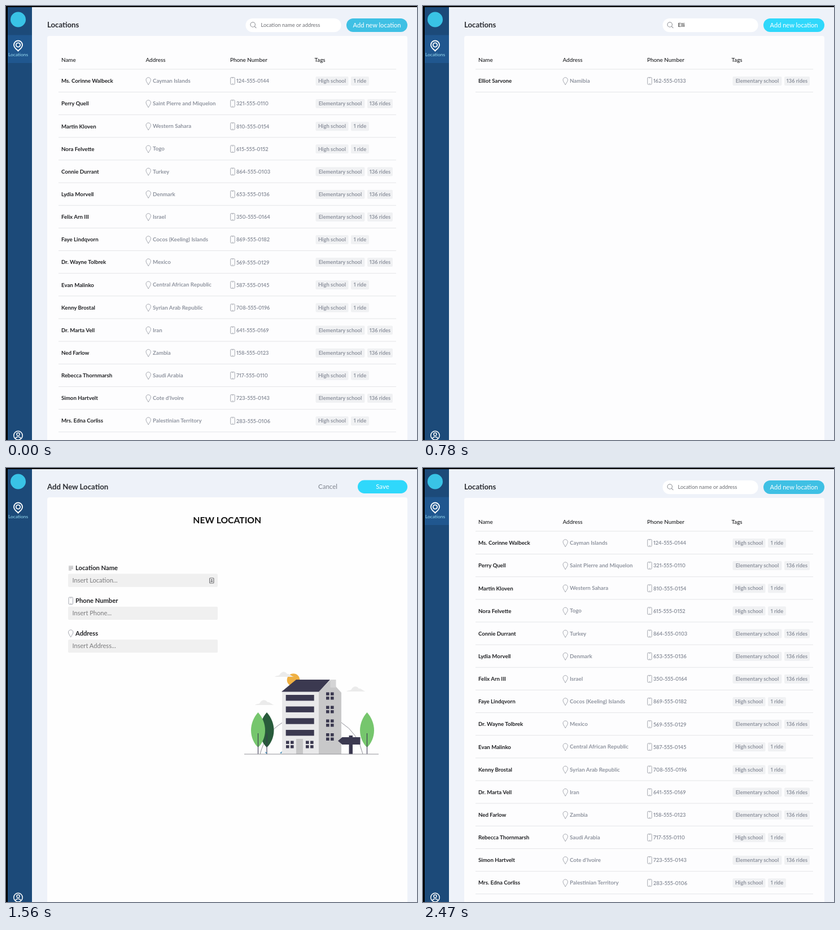
Write an HTML page that moves like this. It is 728 px wide and 769 px high and loops after 2600 ms.

```html
<!DOCTYPE html>
<html lang="en">
<head>
<meta charset="utf-8">
<title>Locations</title>
<style>
  html, body { margin: 0; width: 100%; height: 100%; overflow: hidden; background: #eef2f9; }
  svg { display: block; width: 728px; height: 769px; font-family: Lato, "Open Sans", sans-serif;
    font-variant-numeric: proportional-nums; }
  .bold { font-weight: 700; }
  .mid { font-weight: 500; }
</style>
</head>
<body>
<svg id="stage" viewBox="0 0 728 769"></svg>
<script>
const ROWS = [
  ["Ms. Corinne Walbeck", "Cayman Islands", "124-555-0144", 0],
  ["Perry Quell", "Saint Pierre and Miquelon", "321-555-0110", 1],
  ["Martin Kloven", "Western Sahara", "810-555-0154", 0],
  ["Nora Felvette", "Togo", "615-555-0152", 0],
  ["Connie Durrant", "Turkey", "864-555-0103", 1],
  ["Lydia Morvell", "Denmark", "653-555-0136", 1],
  ["Felix Arn III", "Israel", "350-555-0164", 1],
  ["Faye Lindqvorn", "Cocos (Keeling) Islands", "869-555-0182", 0],
  ["Dr. Wayne Tolbrek", "Mexico", "569-555-0129", 1],
  ["Evan Malinko", "Central African Republic", "587-555-0145", 0],
  ["Kenny Brostal", "Syrian Arab Republic", "708-555-0196", 0],
  ["Dr. Marta Vell", "Iran", "641-555-0169", 1],
  ["Ned Farlow", "Zambia", "158-555-0123", 1],
  ["Rebecca Thornmarsh", "Saudi Arabia", "717-555-0110", 0],
  ["Simon Hartvelt", "Cote d'Ivoire", "723-555-0143", 1],
  ["Mrs. Edna Corliss", "Palestinian Territory", "283-555-0106", 0]
];
const MATCH = ["Elliot Sarvone", "Namibia", "162-555-0133", 1];
const GREY = "#8f949f", NAVY = "#3b3950", CYAN = "#3fc0e4", BRIGHT = "#2fd8fb";

const text = (x, y, size, fill, str, cls = "", anchor = "start") =>
  `<text x="${x}" y="${y}" font-size="${size}" fill="${fill}" class="${cls}" text-anchor="${anchor}">${str}</text>`;
const rect = (x, y, w, h, fill, r = 0, extra = "") =>
  `<rect x="${x}" y="${y}" width="${w}" height="${h}" rx="${r}" fill="${fill}" ${extra}/>`;
const path = (d, fill, stroke = "none", width = 1) =>
  `<path d="${d}" fill="${fill}" stroke="${stroke}" stroke-width="${width}"/>`;
const circle = (x, y, r, fill, stroke = "none", width = 1) =>
  `<circle cx="${x}" cy="${y}" r="${r}" fill="${fill}" stroke="${stroke}" stroke-width="${width}"/>`;
const group = (id, body) => `<g id="${id}">${body}</g>`;

const pin = (x, y) => path(`M${x} ${y + 13}C${x - 2} ${y + 9} ${x - 4.2} ${y + 7} ${x - 4.2} ${y + 4.2}
  a4.2 4.2 0 0 1 8.4 0C${x + 4.2} ${y + 7} ${x + 2} ${y + 9} ${x} ${y + 13}Z`, "none", "#a5a8b0");
const phone = (x, y) => rect(x, y, 7.5, 12.5, "none", 1.5, 'stroke="#a5a8b0"') +
  path(`M${x + 2.2} ${y + 1.3}h3M${x + 2.5} ${y + 11}h2.5`, "none", "#b9bbc1", .8);
const tag = (x, y, w, str) => rect(x, y - 7.8, w, 16, "#f0f1f3", 2) +
  text(x + w / 2, y + 3.4, 9.4, GREY, str, "bold", "middle");

function row([name, place, number, elementary], i) {
  const y = 132.7 + i * 40.15;
  const tags = elementary
    ? tag(548.5, y, 87, "Elementary school") + tag(640, y, 45, "136 rides")
    : tag(548.5, y, 58, "High school") + tag(611, y, 32, "1 ride");
  return text(98, y + 3.5, 9.7, "#202124", name, "bold") +
    pin(252.2, y - 6) + text(260, y + 3.3, 9.7, GREY, place, "bold") +
    phone(397.7, y - 6.2) + text(408, y + 3.6, 9.3, GREY, number, "bold") +
    tags + rect(93, y + 19.3, 598, 1, "#e4e5e8");
}

function sidebar() {
  return rect(3, 2, 43, 767, "#1c4a79") +
    rect(3, 51.5, 43, 49.5, "#20578f", 0, 'id="active"') +
    circle(21.5, 24, 13.5, "#39c3e6") +
    path("M21.5 79.6C19.8 76.8 14 75 14 69a7.5 7.5 0 0 1 15 0C29 75 23.2 76.8 21.5 79.6Z", "none", "#fff", 1.8) +
    circle(21.5, 69, 3.7, "none", "#fff", 1.8) +
    text(21.5, 88.6, 8.4, "#9be0f5", "Locations", "", "middle") +
    circle(21.5, 761, 7.7, "none", "#fff", 1.5) +
    circle(21.5, 758.8, 2.6, "none", "#fff", 1.4) +
    path("M16.6 766.4c1.5-4 8.3-4 9.8 0", "none", "#fff", 1.4);
}

function listPage() {
  const heads = [[98, "Name"], [247.5, "Address"], [397, "Phone Number"], [546.5, "Tags"]];
  return rect(73, 53, 638, 730, "#fdfdfe", 4) +
    text(73, 38.4, 13.2, "#2a2c31", "Locations", "bold") +
    rect(424.5, 22, 169, 24.3, "#fff", 12) +
    circle(437.2, 33, 4.2, "none", "#8e9096", 1.1) + path("M440.3 36.2l3 3", "none", "#8e9096", 1.1) +
    group("hint", text(451.5, 37.2, 9.4, "#6c6e73", "Location name or address")) +
    group("query", text(451.5, 37.2, 9.7, "#222", "Elli")) +
    rect(451.3, 28, 1, 11.5, "#222", 0, 'id="caret"') +
    rect(603, 22, 108, 24, CYAN, 12, 'id="add"') +
    text(657, 37.8, 11.1, "#fff", "Add new location", "", "middle") +
    heads.map(([x, s]) => text(x, 99.3, 9.9, "#1f2023", s, "mid")).join("") +
    rect(93, 111.5, 598, 1, "#e4e5e8") +
    group("all", ROWS.map(row).join("")) + group("found", row(MATCH, 0));
}

function building() {
  const leaf = (x, fill) => path(`M${x} 433C${x + 8} 442 ${x + 12.5} 453 ${x + 12.5} 465S${x + 7} 489 ${x} 495
    C${x - 7} 489 ${x - 12.5} 477 ${x - 12.5} 465S${x - 8} 442 ${x} 433Z`, fill) +
    path(`M${x} 470V507`, "none", NAVY, 1.1);
  const cloud = (x, y) => path(`M${x} ${y}c4-3 7-1 9-4 3-6 10-6 13-1 4-1 7 4 12 5z`, "#ebebeb");
  const panes = (x, y) => [0, 8].map(dx => [0, 7.6].map(dy => rect(x + dx, y + dy, 5.6, 5.4, NAVY)).join("")).join("");
  return path("M450 507Q460 469 489 451.5M594 451Q624 470 632 507", "none", "#8f8f98") +
    circle(509, 375.5, 11.3, "#efb043") +
    cloud(476, 370) + cloud(441, 420) + cloud(603, 396) +
    path("M489 395H554V507H489Z", "#e9e9ea") +
    path("M554 396L574 376 594 398V507H554Z", "#c8c8c9") +
    rect(574.5, 375, 10, 14, "#d4d4d5") +
    path("M488 396.5L514 375H574L554 396.5Z", NAVY) +
    [402, 422.5, 443.3, 464].map(y => rect(495.7, y, 50, 10.4, NAVY)).join("") +
    [397.5, 421.5, 445.5, 470].map(y => panes(567, y)).join("") +
    panes(496, 483.5) + panes(531, 483.5) + rect(514, 480, 12, 27, "#c6c6c7") +
    leaf(462, "#285b3b") + leaf(446.5, "#76c66d") + leaf(639.5, "#76c66d") +
    rect(607.5, 474, 6.5, 33, NAVY) + path("M588 483.5L595.5 477H627.5V490H595.5Z", NAVY) +
    path("M458.5 503l4 1-1 3zM485 505l4-3-1 4z", "#4a8db5") +
    rect(422, 506.5, 238, 1, "#94949a");
}

function formPage() {
  const field = (y, label, hint) => text(123, y, 11.2, "#202124", label, "bold") +
    rect(110, y + 6.5, 265, 23.3, "#f0f0f0", 2) + text(117.5, y + 22, 11.1, "#7b7b7d", hint);
  return rect(73, 52, 638, 730, "#fefefe", 4) +
    text(73, 38, 13.2, "#2a2c31", "Add New Location", "bold") +
    text(570, 37.4, 11.5, "#7d828c", "Cancel", "", "middle") +
    rect(623, 21.5, 88, 23.5, CYAN, 11.7, 'id="save"') +
    text(667, 37.4, 11.5, "#fff", "Save", "", "middle") +
    text(391.7, 97.8, 15.7, "#111", "NEW LOCATION", "bold", "middle") +
    path("M111 174h8M111 176.2h8M111 178.4h8M111 180.6h5", "none", "#a9a9ac", 1.2) +
    phone(111, 229) + pin(114.7, 286.8) +
    field(181, "Location Name", "Insert Location...") +
    field(239.2, "Phone Number", "Insert Phone...") +
    field(297.4, "Address", "Insert Address...") +
    group("autofill", rect(360.7, 195, 7.2, 9, "none", 1, 'stroke="#707073" stroke-width="1.2"') +
      circle(364.3, 198.2, 1.2, "#707073") + rect(362.4, 200.3, 3.8, 1.8, "#707073", .8)) +
    building();
}

const stage = document.getElementById("stage");
stage.innerHTML = rect(0, 0, 728, 769, "#eef2f9") + group("list", listPage()) + group("form", formPage()) +
  sidebar() + rect(0, 0, 3, 769, "#000") + rect(0, 0, 728, 2, "#000");

const el = id => document.getElementById(id);
const show = (id, on) => el(id).setAttribute("display", on ? "inline" : "none");
const hover = (id, on) => el(id).setAttribute("fill", on ? BRIGHT : CYAN);

function draw(now) {
  const t = now % 2600;
  const within = (from, to) => t >= from && t < to;
  const form = within(1040, 2080), searched = within(520, 1040);
  show("form", form);
  show("list", !form);
  show("active", !form);
  show("all", !searched);
  show("found", searched);
  show("hint", !searched);
  show("query", searched);
  show("caret", within(390, 520));
  show("autofill", within(1300, 2080));
  hover("add", within(780, 1040));
  hover("save", within(1560, 1690));
}

const start = performance.now();
function tick() {
  draw(performance.now() - start);
  requestAnimationFrame(tick);
}
tick();
</script>
</body>
</html>
```
